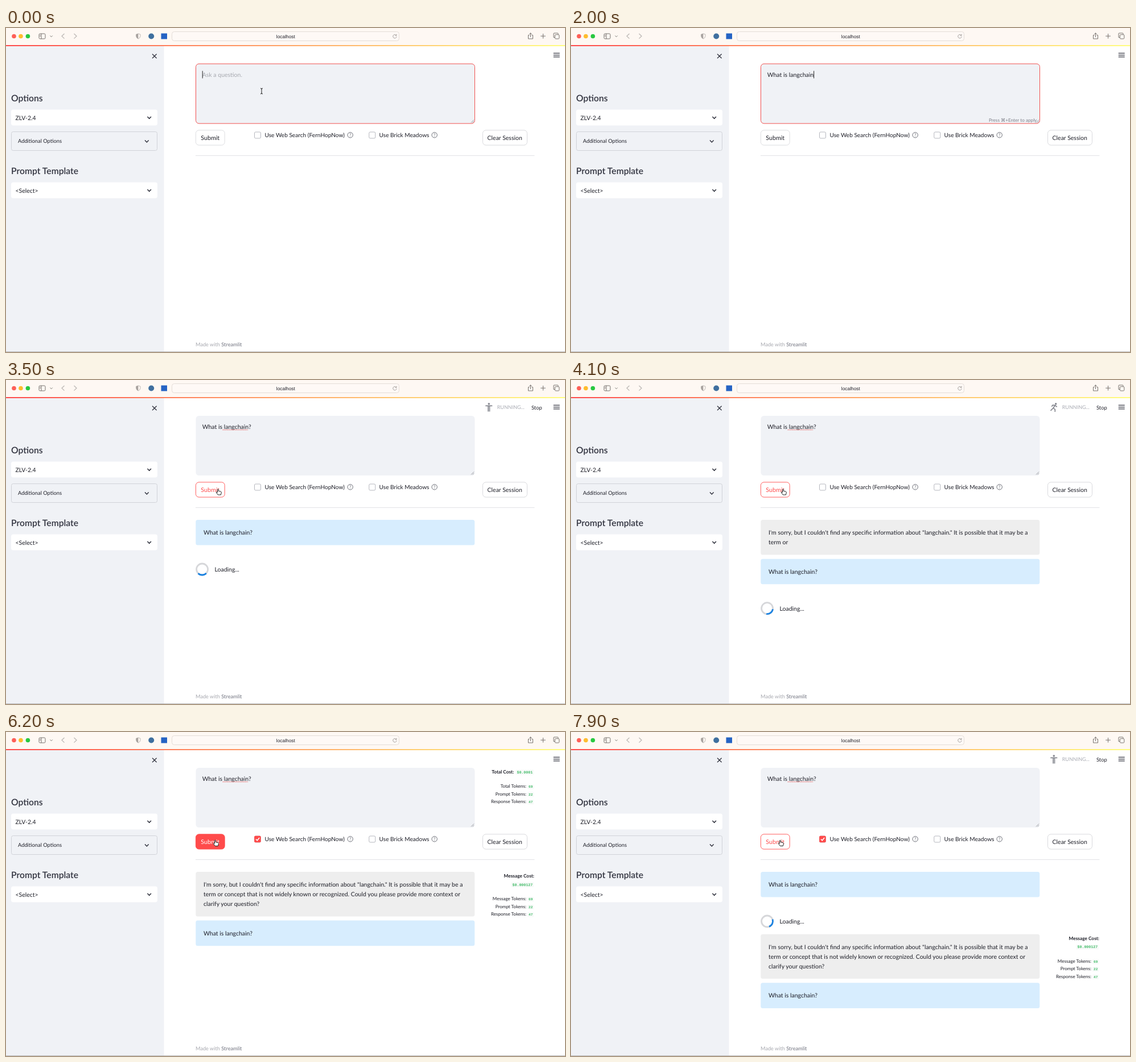
These frames come from a looping animation (982x570 px, 8000 ms). An HTML page:

```html
<!DOCTYPE html>
<html lang="en">
<head>
<meta charset="utf-8">
<title>Chat demo</title>
<style>
  html, body { margin: 0; height: 100%; overflow: hidden; background: #fff; }
  svg { display: block; font: 10.5px Lato, sans-serif; fill: #1e1f28; text-rendering: geometricPrecision; }
  text { white-space: pre; }
  .line { fill: none; stroke: #31333f; stroke-width: 1.5; }
  .thin { fill: none; stroke: #77726f; stroke-width: 1; }
  .pale { stroke: #bdb8b5; }
  .box { fill: #fff; stroke: #d9dadd; }
  .heading { font-size: 15.7px; font-weight: 600; fill: #31333f; }
  .label { font-size: 10.15px; }
  .code { font-family: "Liberation Mono", monospace; font-weight: bold; fill: #45bd6b; }
  .end { text-anchor: end; }
  .mid { text-anchor: middle; }
</style>
</head>
<body>
<svg width="982" height="570" viewBox="0 0 982 570">
  <defs>
    <linearGradient id="bar"><stop stop-color="#ff4b4b"/><stop offset="1" stop-color="#fffd80"/></linearGradient>
    <path id="chevron" class="line" d="M-3.3-1.7L0 1.7L3.3-1.7"/>
    <g id="help">
      <circle class="line" r="4.7" style="stroke:#6b6d76;stroke-width:1"/>
      <text class="mid" y="2.8" font-size="7.8" fill="#6b6d76">?</text>
    </g>
    <g id="ibeam"><path class="line" d="M-2-5Q0-5 0-3.5Q0-5 2-5M0-4V4M-2 5Q0 5 0 3.5Q0 5 2 5" style="stroke:#222;stroke-width:1"/></g>
    <path id="arrow" d="M0-5V4L2.1 2.2L3.6 5.3L5 4.6L3.6 1.7H6.3Z" fill="#111" stroke="#fff" stroke-width=".7"/>
    <path id="hand" d="M-2.4-4.6Q-1.4-5.8-.6-4.6V-1.7L3.3-.9Q4.6-.4 4.3 1.2L3.4 5H-1.6L-4.6 1Q-4.8-.6-3.2.1L-2.4.8Z" fill="#fff" stroke="#222" stroke-width="1"/>
  </defs>

  <!-- browser bar -->
  <rect width="982" height="30" fill="#fef8f3"/>
  <circle cx="14" cy="14.5" r="3.8" fill="#fe5f57"/>
  <circle cx="26" cy="14.5" r="3.8" fill="#febc2e"/>
  <circle cx="38.4" cy="14.5" r="3.8" fill="#28c840"/>
  <g class="thin">
    <rect x="58" y="10" width="11" height="9" rx="1.8"/>
    <path d="M62 10V19M59.3 12.5H60.8M59.3 14.5H60.8M77.5 13.5L79.6 15.6L81.7 13.5"/>
    <path class="pale" d="M102.5 10L98 14.3L102.5 18.6M119.5 10L124 14.3L119.5 18.6" stroke-width="1.3"/>
    <path class="pale" d="M232.3 10L228.6 11.2V14.5Q229 17.6 232.3 19Q235.6 17.6 236 14.5V11.2Z"/>
    <path d="M232.3 10L228.6 11.2V14.5Q229 17.6 232.3 19Z" fill="#a8a29f" stroke="none"/>
    <rect x="291.5" y="6.5" width="399" height="16" rx="4" fill="#fef9f6" stroke="#e4ddd8"/>
    <path d="M685.7 13A3.2 3.2 0 1 0 686.2 15M686 10.8V13.3H683.4" stroke="#9b9693" stroke-width=".9"/>
    <path d="M919.5 12.5H917.5V19H925.5V12.5H923.5M921.5 16V9M919.2 11L921.5 8.8L923.8 11M943.5 10V18.5M939.2 14.2H947.8"/>
    <path d="M964 16.5H962V10Q962 9 963 9H969Q970 9 970 10V11.5"/>
    <rect x="964.3" y="11.7" width="7.5" height="7.3" rx="1.4"/>
  </g>
  <circle cx="255.2" cy="14.5" r="5" fill="#3f6f9f"/>
  <rect x="272.5" y="9.5" width="10.5" height="10" fill="#2563c4"/>
  <text class="mid" x="491.3" y="17.6" style="font:8.4px 'Liberation Sans', sans-serif">localhost</text>

  <!-- sidebar -->
  <rect y="31" width="277.5" height="539" fill="#f0f2f6"/>
  <rect y="30" width="982" height="2" fill="url(#bar)"/>
  <path class="line" d="M257 45.7L264.6 53.3M264.6 45.7L257 53.3" style="stroke-width:1.3"/>
  <text class="heading" x="9" y="128.5">Options</text>
  <rect x="9" y="143.5" width="257" height="28" rx="4" fill="#fff"/>
  <text x="16.5" y="161.7">ZLV-2.4</text>
  <use href="#chevron" x="251.7" y="157.6"/>
  <rect x="9.5" y="182.5" width="256" height="33" rx="3" fill="none" stroke="#d0d2d8"/>
  <text x="21" y="202.3" font-size="9.3">Additional Options</text>
  <use href="#chevron" x="247.3" y="199.2"/>
  <text class="heading" x="9" y="256.7">Prompt Template</text>
  <rect x="9" y="271.5" width="257" height="28" rx="4" fill="#fff"/>
  <text x="16.5" y="289.7">&lt;Select&gt;</text>
  <use href="#chevron" x="251.7" y="285.6"/>

  <!-- main form -->
  <path class="line" d="M961.7 44.3H972.7M961.7 47.6H972.7M961.7 50.9H972.7" style="stroke-width:1.3"/>
  <rect id="area" x="333.5" y="63" width="490" height="105" rx="5.5" fill="#f0f2f6" stroke="#f0504f"/>
  <path d="M817 166.5L822 161.5M819.7 166.5L822 164.2" class="line" style="stroke:#85868c;stroke-width:.8"/>
  <text id="prompt" x="344.7" y="86"></text>
  <path id="typo" d="M380.8 87.6H424.8" fill="none" stroke="#e8504e" stroke-dasharray="1.2 1.2" stroke-width="1.2"/>
  <rect id="caret" y="75.5" width="1" height="13" fill="#222"/>
  <text id="hint" class="end" x="818.3" y="164.7" font-size="8.2" fill="#7d7f88">Press ⌘+Enter to apply</text>
  <rect id="submit" x="333.4" y="179.8" width="50.8" height="26.3" rx="5.5" stroke-width=".9"/>
  <text id="submitText" class="mid" x="358.7" y="196.7" font-size="10.7">Submit</text>
  <rect x="436.5" y="183" width="11" height="11" rx="2" class="box" style="stroke:#b5b7be"/>
  <g id="checked">
    <rect x="436.2" y="182.7" width="11.5" height="11.5" rx="2" fill="#ff4b4b"/>
    <path class="line" d="M439 188.5L441.3 190.8L445.2 186" style="stroke:#fff"/>
  </g>
  <text class="label" x="454.5" y="192">Use Web Search (FernHopNow)</text>
  <use href="#help" x="604.7" y="188.3"/>
  <rect x="637.8" y="183" width="11" height="11" rx="2" class="box" style="stroke:#b5b7be"/>
  <text class="label" x="655.6" y="192">Use Brick Meadows</text>
  <use href="#help" x="752.7" y="188.3"/>
  <rect x="837.5" y="179.8" width="78" height="26.3" rx="5.5" class="box"/>
  <text class="mid" x="876.2" y="196.7">Clear Session</text>
  <path d="M333 224.5H928.5" stroke="#e2e3e6"/>
  <text x="333" y="560" font-size="9.2" fill="#a6a7ae">Made with <tspan fill="#7b7d88" font-weight="500">Streamlit</tspan></text>

  <g id="live"></g>
  <use id="mouse"/>
  <path d="M0 569.5H982" stroke="#b9b9bb"/>
</svg>
<script>
const LOOP = 8000;
const QUESTION = "What is langchain?";
const REPLY = [
  "I'm sorry, but I couldn't find any specific information about \"langchain.\" It is possible that it may be a",
  "term or concept that is not widely known or recognized. Could you please provide more context or",
  "clarify your question?",
].map(line => line.split(" "));

// [time, characters typed]
const TYPING = [[0, 0], [600, 1], [700, 2], [800, 3], [900, 4], [1000, 6], [1100, 7], [1200, 8], [1400, 9],
  [1500, 10], [1600, 11], [1700, 12], [1800, 14], [1900, 15], [2000, 17], [2300, 18]];
// [time, x, y]
const MOUSE = [[0, 449, 111], [2600, 449, 111], [3000, 374, 197], [4900, 374, 197], [5000, 433, 196],
  [5200, 442, 190], [5400, 442, 190], [5800, 369, 195.5], [LOOP, 369, 195.5]];
// head x, head y, limbs
const POSES = [
  [0, -6.2, "M0-4V1H3.6L5.6 5.5M0-1.6H3.5M-1.6-.6A4 4 0 1 0 3 4.6"],
  [3.4, -6, "M2.2-3.5L-1.2 1.4L2 3.6V8M-1.2 1.4L-5.8 6M-4-1.2L-2-3.8L2.2-3.5L5.4-.6"],
  [3, -6, "M2-3.6L-1.4-.4L1.6 1.6V5M2-3.6L5-1M-7 4.4a2.5 2.5 0 1 0 5 0a2.5 2.5 0 1 0-5 0M2.4 4.4a2.5 2.5 0 1 0 5 0a2.5 2.5 0 1 0-5 0"],
  [0, -6, "M-6-2.6H6M-1.2-2.6V7.6M1.2-2.6V7.6"],
];

const el = Object.fromEntries([...document.querySelectorAll("svg [id]")].map(node => [node.id, node]));
const set = (node, attrs) => Object.entries(attrs).forEach(([name, value]) => node.setAttribute(name, value));
const show = (node, on) => { node.style.display = on ? "" : "none"; };
const within = (t, from, to) => t >= from && t < to;
const clamp = v => Math.max(0, Math.min(1, v));

const label = (x, y, content, attrs = "") => `<text x="${x}" y="${y}" ${attrs}>${content}</text>`;

function code(right, y, content, size) {
  const width = content.length * size * 0.6;
  return `<rect x="${right - width - 2}" y="${y - size}" width="${width + 4}" height="${size + 2.5}" rx="1.5" fill="#f8faf9"/>`
    + label(right, y, content, `class="code end" font-size="${size}"`);
}

const counts = (y, first) => [[first, 69], ["Prompt", 22], ["Response", 47]].map(([name, n], i) =>
  label(914, y + i * 13.4, name + " Tokens:", 'class="end" font-size="8.05"') + code(925.3, y + i * 13.4, String(n), 6.1)).join("");

const costTitle = (x, y, content) => label(x, y, content, 'class="end" font-size="8.3" font-weight="bold"');

const totals = () => costTitle(892.3, 73, "Total Cost:") + code(925.3, 73, "$0.0001", 6.65) + counts(98.3, "Total");

const messageCost = y => costTitle(928, y + 10, "Message Cost:") + code(925.3, y + 24.6, "$0.000127", 6.65)
  + counts(y + 50.2, "Message");

const bubbleHeight = lines => 44.6 + 16.9 * (lines - 1);

const bubble = (y, lines, color) =>
  `<rect x="333.3" y="${y}" width="490" height="${bubbleHeight(lines.length)}" rx="3.5" fill="${color}"/>`
  + lines.map((line, i) => label(347, y + 26 + i * 16.9, line)).join("");

const question = y => bubble(y, [QUESTION], "#d7edfe");

const spinner = (y, age) => `<g transform="translate(344.6 ${y})" fill="none" stroke-width="2.8">
  <circle r="10" stroke="#d6d7da"/>
  <path d="M-7.07-7.07A10 10 0 0 1 7.07-7.07" stroke="#1c83e1" transform="rotate(${age * 0.54})"/></g>`
  + label(366.5, y + 3.8, "Loading...");

function running(t) {
  const [x, y, limbs] = POSES[t / 100 % POSES.length];
  return `<g transform="translate(848.3 48)" fill="#85878f"><circle cx="${x}" cy="${y}" r="1.8"/>
    <path d="${limbs}" fill="none" stroke="#85878f" stroke-width="1.7"/></g>`
    + label(862.7, 51.2, "RUNNING...", 'font-size="9" fill="#a9abb3"') + label(923, 51.6, "Stop", 'font-size="9.3"');
}

function replyLines(count) {
  const lines = [];
  for (const words of REPLY) {
    if (count <= 0) break;
    lines.push(words.slice(0, count).join(" "));
    count -= words.length;
  }
  return lines;
}

function conversation(t) {
  if (t < 3400) return "";
  let out = "", y = 246;
  if (t >= 6300) {
    out += question(y) + spinner(y + 87, t - 6354);
    y += 109.7;
  }
  const lines = replyLines(Math.floor((t - 3500) / 28.5));
  if (lines.length) {
    out += bubble(y, lines, "#eeeeee");
    if (t >= 4800) out += messageCost(y);
    y += bubbleHeight(lines.length) + 7.2;
  }
  out += question(y);
  if (t < 4800) out += spinner(y + 87, t - 3168);
  return out;
}

function mouseAt(t) {
  const i = MOUSE.findIndex(([time]) => time > t);
  const [t0, x0, y0] = MOUSE[i - 1], [t1, x1, y1] = MOUSE[i];
  const k = (t - t0) / (t1 - t0);
  return [x0 + (x1 - x0) * k, y0 + (y1 - y0) * k];
}

function drawPrompt(t) {
  const typed = TYPING.findLast(([time]) => time <= t)[1];
  el.prompt.textContent = typed ? QUESTION.slice(0, typed) : "Ask a question.";
  el.prompt.style.fill = typed ? "" : "#a6a8af";
  const width = typed ? el.prompt.getComputedTextLength() : 0;
  const blink = t < 600 ? t / 300 : (t - 2700) / 300;
  set(el.caret, { x: 344.7 + width, opacity: t < 3100 ? 1 - clamp(blink) : 0 });
  set(el.area, { "stroke-opacity": t < 3100 ? 1 : t < 3200 ? 0.6 : 0 });
  show(el.typo, t >= 2300);
  show(el.hint, within(t, 600, 3100));
}

function drawMouse(t) {
  const [x, y] = mouseAt(t);
  const overSubmit = x < 384 && y > 179;
  const pressed = within(t, 3100, 3200) || within(t, 6200, 6300);
  const kind = y < 168 ? "ibeam" : overSubmit || x > 436 && y > 182 ? "hand" : "arrow";
  set(el.mouse, { href: "#" + kind, x, y });
  show(el.mouse, !within(t, 600, 2600));
  set(el.submit, { fill: pressed ? "#ff4b4b" : "#fff", stroke: overSubmit ? "#ff4b4b" : "#d9dadd" });
  set(el.submitText, { fill: pressed ? "#fff" : overSubmit ? "#ff4b4b" : "#1e1f28" });
}

function draw(t) {
  drawPrompt(t);
  drawMouse(t);
  show(el.checked, t >= 5300);
  const busy = within(t, 3300, 4800) || within(t, 5400, 5600) || t >= 6300;
  el.live.innerHTML = conversation(t) + (busy ? running(t) : "") + (within(t, 4800, 6300) ? totals() : "");
}

let last = -1;
function tick() {
  const t = Math.floor(performance.now() / 100 + 0.01) * 100 % LOOP;
  if (t !== last) draw(last = t);
  requestAnimationFrame(tick);
}
tick();
</script>
</body>
</html>
```
